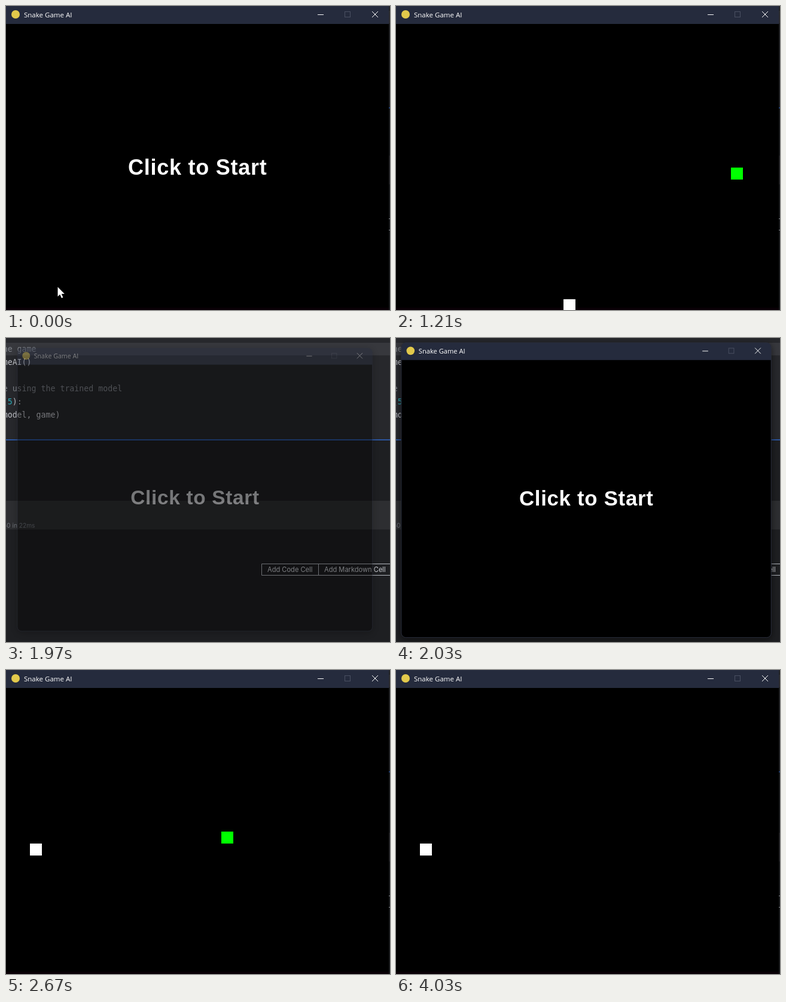
Write an HTML page that moves like this. It is 642 px wide and 508 px high and loops after 4060 ms.

```html
<!DOCTYPE html>
<html lang="en">
<head>
<meta charset="utf-8">
<title>Snake Game AI</title>
<style>
  html, body { margin: 0; width: 100%; height: 100%; overflow: hidden; background: #1e1f22; }
  svg { display: block; width: 642px; height: 508px; }
  text { white-space: pre; }
  .code { font: 13.25px "DejaVu Sans Mono", monospace; fill: #c0c2c8; }
  .code .comment { fill: #7f838a; }
  .code .number { fill: #2aacb8; }
  .status { font: 10.2px Inter, sans-serif; fill: #6f737a; }
  .buttons { font: 11.1px Inter, sans-serif; fill: #ced0d6; }
  .buttons path { fill: none; stroke: #b4b8bf; }
  .caption { font: 11.5px "Open Sans", sans-serif; fill: #fff; }
  .prompt { font: bold 36px "Liberation Sans", Arial, sans-serif; letter-spacing: .75px; fill: #fff; }
  .controls { fill: none; stroke: #fff; }
  #window { filter: drop-shadow(0 3px 6px rgba(0, 0, 0, .55)); }
  .glow { fill: #090006; mix-blend-mode: lighten; }
</style>
</head>
<body>
<svg viewBox="0 0 642 508">
  <defs>
    <clipPath id="frameClip"><rect class="corner" width="640" height="510"/></clipPath>
  </defs>

  <!-- notebook behind the game -->
  <rect width="642" height="508" fill="#1e1f22"/>
  <rect width="642" height="170" fill="#27282c"/>
  <rect y="8" width="642" height="21" fill="#37383d"/>
  <rect y="169.5" width="642" height="1.5" fill="#2f65c4"/>
  <g class="code">
    <text class="comment" x="-117" y="23"># Initialize the game</text>
    <text x="-117" y="45">game = SnakeGameAI()</text>
    <text class="comment" x="-117" y="89"># Play the game using the trained model</text>
    <text x="-117" y="111">for _ in range(<tspan class="number">5</tspan>):</text>
    <text x="-117" y="133">    play_game(model, game)</text>
  </g>
  <g id="output">
    <rect y="250" width="642" height="48" fill="#2d2e31"/>
    <text class="status" x="48.5" y="294.5" text-anchor="end">Executed at 12:20:50 in 22ms</text>
    <g class="buttons">
      <path d="M427.5 355.5H660V374.5H427.5ZM522.5 355.5V374.5"/>
      <text x="437" y="368.5">Add Code Cell</text>
      <text x="532" y="368.5">Add Markdown Cell</text>
    </g>
  </g>

  <!-- game window -->
  <g id="window">
    <g clip-path="url(#frameClip)">
      <rect width="640" height="510"/>
      <rect width="640" height="30" fill="#252b3d"/>
      <circle cx="16" cy="14" r="7" fill="#e2c94b"/>
      <text class="caption" x="30" y="18.7">Snake Game AI</text>
      <g class="controls">
        <path d="M521 14.5H531M612 9L622 19M622 9L612 19"/>
        <rect id="maximize" x="566.5" y="9.5" width="9" height="9"/>
      </g>
      <text id="prompt" class="prompt" x="204" y="282">Click to Start</text>
      <g id="board">
        <rect id="food" width="20" height="20" fill="#fff"/>
        <rect id="snake" y="270" width="20" height="20" fill="#0f0"/>
      </g>
    </g>
    <rect id="border" class="corner" width="640" height="510" fill="none" stroke="#2c303f"/>
  </g>
  <path id="cursor" fill="#fff" d="M86.5 469.5v16l3.7-3.5 2.7 6 2.5-1.1-2.6-5.9h5Z"/>
  <rect class="glow" y="504" width="642" height="4"/>
</svg>

<script>
  const LOOP = 4060;
  const CLOSE = { start: 1750, end: 1900 };
  const OPEN = { start: 1940, end: 2240 };

  // Each time moves the snake one 20 px cell to the right.
  const rounds = [
    { food: [280, 490], steps: [30, 130, 220, 310, 430, 520, 610, 670, 820, 910, 1000, 1120, 1210, 1300, 1390, 1490, 1570] },
    { food: [40, 290], steps: [2520, 2580, 2670, 2760, 2880, 2940, 3030, 3150, 3240, 3370, 3460, 3570, 3670, 3730, 3880, 3940, 4030] }
  ];

  const el = id => document.getElementById(id);
  const set = (node, attrs) => {
    for (const name in attrs) node.setAttribute(name, attrs[name]);
  };
  const show = (id, visible) => set(el(id), { visibility: visible ? "visible" : "hidden" });
  const clamp = v => Math.min(1, Math.max(0, v));
  const progress = (t, span) => clamp((t - span.start) / (span.end - span.start));

  function windowPose(t) {
    if (t < OPEN.start) {
      const p = progress(t, CLOSE);
      return { scale: 1 - 0.057 * p, opacity: 1 - p, originY: 263 };
    }
    const p = progress(t, OPEN);
    return { scale: 0.9 + 0.1 * (1 - (1 - p) ** 3), opacity: clamp((t - OPEN.start) / 80), originY: 232 };
  }

  function render(t) {
    const second = t >= OPEN.start;
    const { food, steps } = rounds[second ? 1 : 0];
    const moved = steps.filter(time => time <= t).length - 1;
    const playing = moved >= 0;

    show("prompt", !playing);
    show("board", playing);
    show("cursor", t < rounds[0].steps[0]);
    set(el("food"), { x: food[0], y: food[1] });
    set(el("snake"), { x: 320 + 20 * moved });

    const { scale, opacity, originY } = windowPose(t);
    const floating = scale < 1;
    set(el("window"), {
      opacity,
      transform: `translate(${262 * (1 - scale)} ${originY * (1 - scale)}) scale(${scale})`
    });
    document.querySelectorAll(".corner").forEach(node => set(node, { rx: floating ? 8 : 0 }));
    show("border", floating);
    set(el("maximize"), { stroke: floating && !second ? "#fff" : "#4a5062" });
    set(el("output"), { transform: `translate(0 ${second ? 22 : 0})` });
  }

  const began = performance.now();
  function tick() {
    render((performance.now() - began) % LOOP);
    requestAnimationFrame(tick);
  }
  tick();
</script>
</body>
</html>
```
